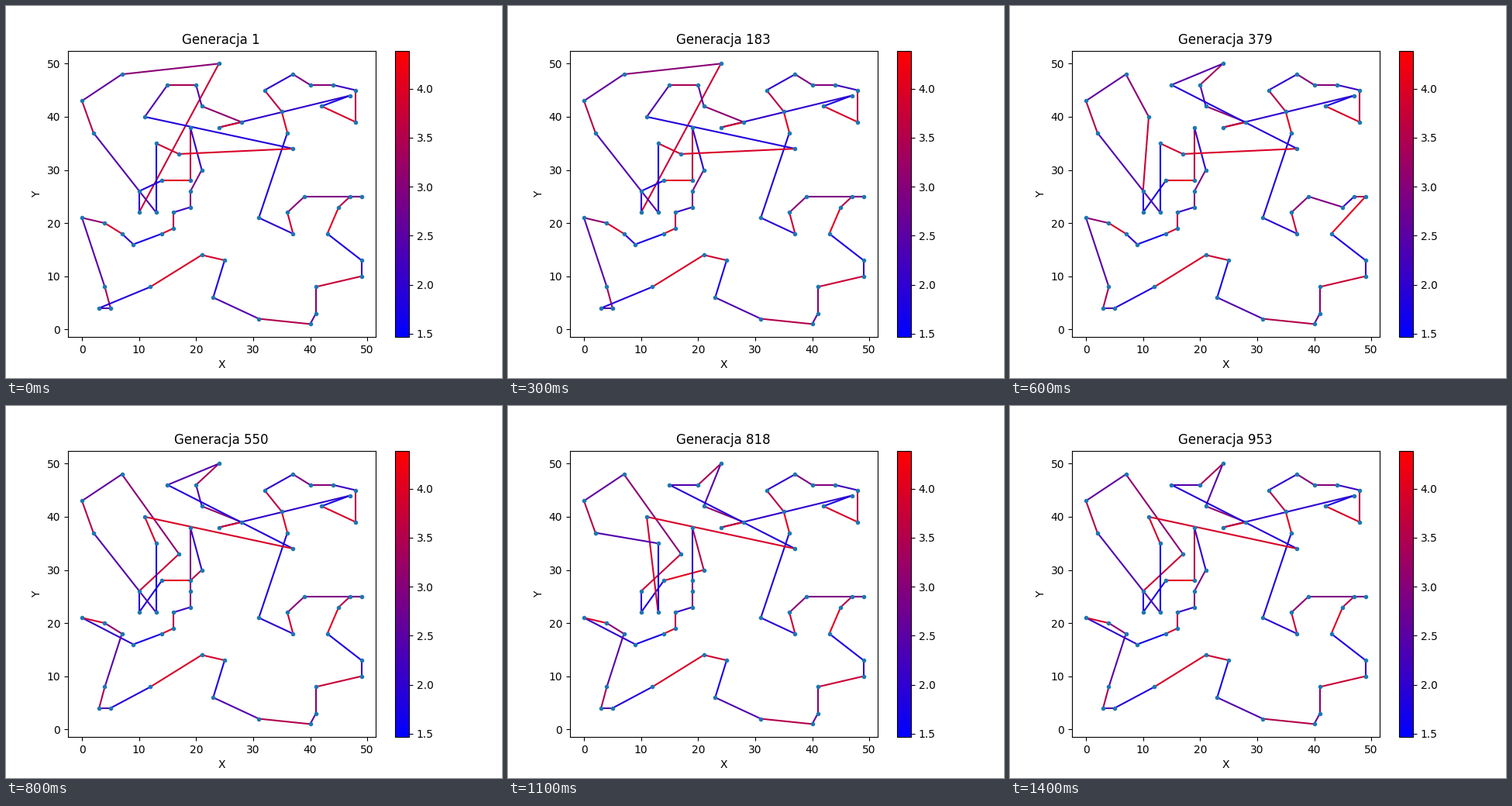
A matplotlib script that plays this animation: 640 px wide and 480 px high, repeating every 3 s.

```python
import numpy as np
import matplotlib.pyplot as plt
from matplotlib.animation import FuncAnimation
from matplotlib.collections import LineCollection
from matplotlib.colors import LinearSegmentedColormap

# Cities in the order of the first tour.
CITIES = np.array([
    (39, 25), (36, 22), (37, 18), (31, 21), (36, 37), (35, 41), (32, 45), (37, 48),
    (40, 46), (44, 46), (48, 45), (48, 39), (42, 42), (47, 44), (24, 38), (28, 39),
    (21, 42), (20, 46), (15, 46), (11, 40), (37, 34), (17, 33), (13, 35), (13, 22),
    (2, 37), (0, 43), (7, 48), (24, 50), (10, 22), (10, 26), (14, 28), (19, 28),
    (19, 38), (21, 30), (19, 26), (19, 23), (16, 22), (16, 19), (14, 18), (9, 16),
    (7, 18), (4, 20), (0, 21), (4, 8), (5, 4), (3, 4), (12, 8), (21, 14),
    (25, 13), (23, 6), (31, 2), (40, 1), (41, 3), (41, 8), (49, 10), (49, 13),
    (43, 18), (45, 23), (47, 25), (49, 25),
])

# Step, generation, and the tour positions swapped on the way there.
MILESTONES = [
    (0, 1, []),
    (2, 70, [(16, 27)]),
    (4, 296, [(16, 27), (19, 27), (21, 27)]),
    (6, 379, [(18, 19), (28, 29), (44, 45), (21, 27), (57, 59)]),
    (8, 550, [(21, 27), (57, 59), (32, 33), (40, 42)]),
    (11, 818, [(17, 18), (32, 33), (31, 33), (22, 23)]),
    (14, 953, [(22, 23), (31, 33)]),
]
LAST_STEP = MILESTONES[-1][0]
LOW, HIGH = 1.465, 4.387
FIRST_LEG = 24  # drawn first, so later legs lie on top


def wave(index, peak, period):
    return np.cos(2 * np.pi * (index - peak) / period)


def leg_weights():
    """Weight of each tour position, as two overlaid waves."""
    leg = np.arange(len(CITIES))
    share = 0.48 + 0.33 * wave(leg, 14, 3.25) + 0.2 * wave(leg, 10, 5.2)
    return LOW + (HIGH - LOW) * np.clip(share, 0, 1)


def tour_at(step):
    """Apply the swaps of each milestone evenly over the steps leading to it."""
    order = np.arange(len(CITIES))
    for (start, _, _), (end, _, swaps) in zip(MILESTONES, MILESTONES[1:]):
        progress = np.clip((step - start) / (end - start), 0, 1)
        for a, b in swaps[:int(progress * len(swaps))]:
            order[[a, b]] = order[[b, a]]
    return CITIES[order]


def generation_at(step):
    steps, generations, _ = zip(*MILESTONES)
    return int(np.interp(step, steps, generations))


def legs(tour):
    pairs = np.stack([tour, np.roll(tour, -1, axis=0)], axis=1)
    return np.roll(pairs, -FIRST_LEG, axis=0)


fig, ax = plt.subplots(figsize=(6.4, 4.8), dpi=100)
cmap = LinearSegmentedColormap.from_list("blue_red", ["blue", "red"])
route = LineCollection(legs(CITIES), cmap=cmap, linewidths=1.5)
route.set_array(np.roll(leg_weights(), -FIRST_LEG))
route.set_clim(LOW, HIGH)
ax.add_collection(route)
ax.plot(*CITIES.T, "o", color="tab:blue", markersize=3, zorder=3)
ax.set_xlabel("X")
ax.set_ylabel("Y")
title = ax.set_title("", x=0.4985)
fig.colorbar(route, ax=ax)


def update(frame):
    step = min(frame, LAST_STEP)
    route.set_segments(legs(tour_at(step)))
    title.set_text(f"Generacja {generation_at(step)}")
    return route, title


anim = FuncAnimation(fig, update, frames=30, interval=100, repeat=True,
                     repeat_delay=0, blit=False)
plt.show()
```
